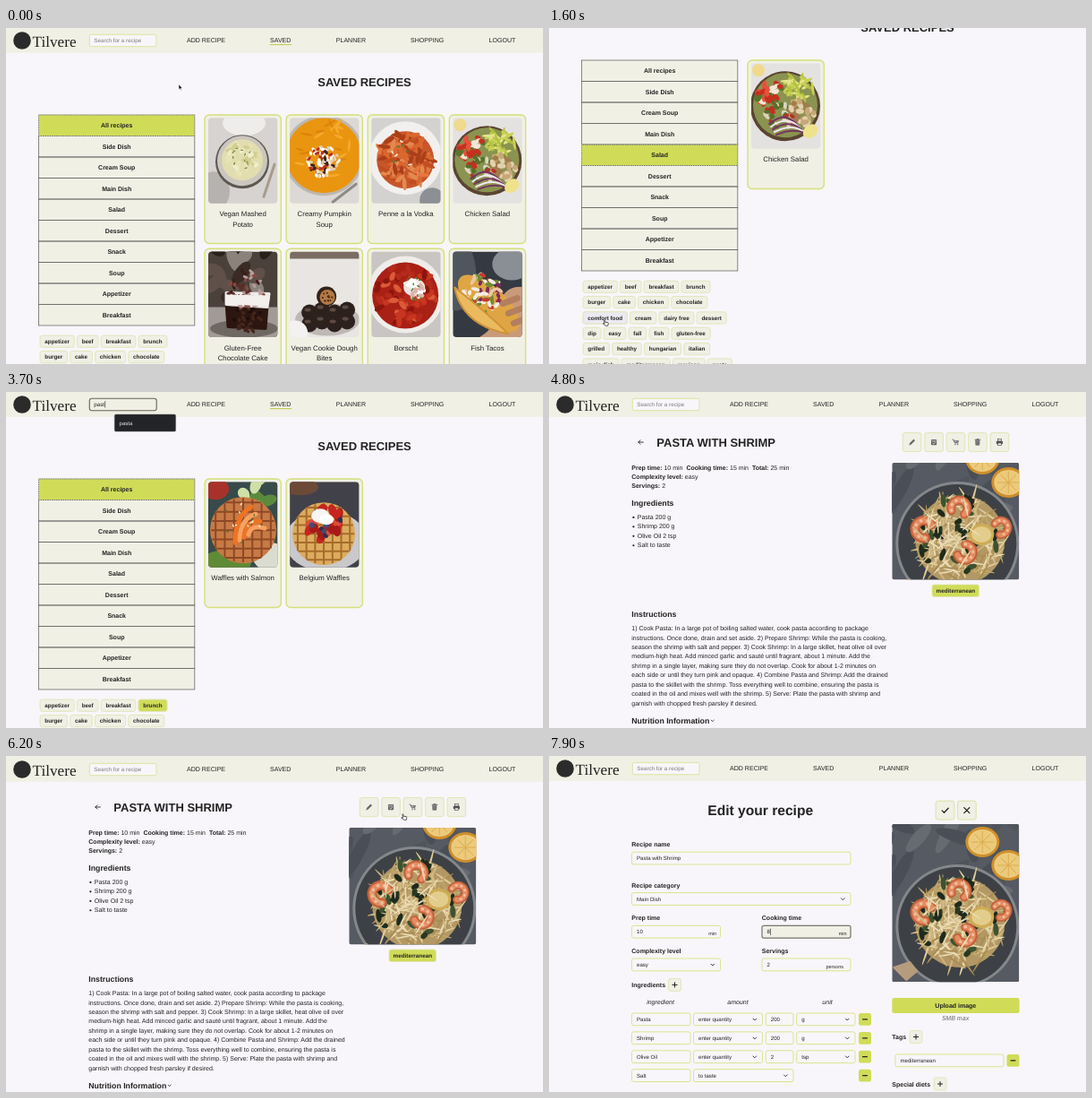
Write an HTML page that moves like this. It is 600 by 375 pixels and loops after 8000 ms.

```html
<!DOCTYPE html>
<html lang="en">
<head>
<meta charset="utf-8">
<title>Recipe book</title>
<style>
  html, body { margin: 0; width: 100%; height: 100%; overflow: hidden; background: #f8f6fa; }
  svg { display: block; width: 100vw; height: 100vh; }
  text { font-family: "Liberation Sans", Arial, sans-serif; text-rendering: geometricPrecision; fill: #222; }
  text.brand { font-family: "Liberation Serif", "Noto Serif", serif; }
</style>
</head>
<body>
<svg id="stage" viewBox="0 0 600 375"></svg>
<script>
const LOOP = 8000, STEP = 100;
const LIME = '#d0dc58', EDGE = '#d8e284', PALE = '#f0f0e5', PAPER = '#f8f6fa', INK = '#222';
const stage = document.getElementById('stage');

// Drawing helpers
function add(parent, tag, attrs = {}, text) {
  const el = document.createElementNS('http://www.w3.org/2000/svg', tag);
  for (const k in attrs) el.setAttribute(k, attrs[k]);
  if (text !== undefined) el.textContent = text;
  return parent.appendChild(el);
}
const group = (p, x = 0, y = 0, extra = '') => add(p, 'g', { transform: `translate(${x} ${y}) ${extra}` });
const box = (p, x, y, width, height, fill, stroke = 'none', rx = 0, sw = 1) =>
  add(p, 'rect', { x, y, width, height, fill, stroke, rx, 'stroke-width': sw });
const oval = (p, cx, cy, rx, fill, ry = rx, turn = 0) =>
  add(p, 'ellipse', { cx, cy, rx, ry, fill, transform: `rotate(${turn} ${cx} ${cy})` });
const path = (p, d, stroke, sw = 1, fill = 'none') =>
  add(p, 'path', { d, stroke, fill, 'stroke-width': sw, 'stroke-linecap': 'round', 'stroke-linejoin': 'round' });
// y is the middle of the capitals
const label = (p, x, y, text, size, attrs = {}) =>
  add(p, 'text', { x, y: y + size * 0.36, 'font-size': size, ...attrs }, text);
const BOLD = { 'font-weight': 700 }, MID = { 'text-anchor': 'middle' }, BOLD_MID = { ...BOLD, ...MID };

// Timing helpers: each track sets one element from the time
const tracks = [];
function show(el, ...spans) {
  tracks.push(t => { el.style.display = spans.some(([a, b]) => t >= a && t < b) ? '' : 'none'; });
  return el;
}
function valuesAt(steps, t) {
  const i = steps.findIndex(([time]) => time > t);
  if (i < 1) return steps.at(i).slice(1);
  const [a, ...from] = steps[i - 1], [b, ...to] = steps[i];
  const k = (t - a) / (b - a), eased = k * k * (3 - 2 * k);
  return from.map((v, n) => v + (to[n] - v) * eased);
}
const move = (el, steps) =>
  tracks.push(t => el.setAttribute('transform', `translate(${valuesAt(steps, t)})`));
const fade = (el, steps) =>
  tracks.push(t => el.setAttribute('opacity', valuesAt(steps, t)[0]));
function typed(p, x, y, size, table) {
  for (const [from, to, text] of table) {
    const g = show(group(p), [from, to]);
    const end = x + label(g, x, y, text, size).getComputedTextLength() + 0.6;
    path(g, `M${end} ${y - 3.4}v6.8`, INK, 0.6);
  }
}

// Photo helpers
function random(seed) {
  return () => (seed = seed * 16807 % 2147483647) / 2147483647;
}
function bits(p, seed, n, cx, cy, spread, rx, ry, colours) {
  const rnd = random(seed * 7919);
  for (let i = 0; i < n; i++) {
    const a = rnd() * 6.283, d = spread * Math.sqrt(rnd());
    oval(p, cx + d * Math.cos(a), cy + d * Math.sin(a), rx * (0.7 + rnd() * 0.6),
      colours[Math.floor(rnd() * colours.length)], ry, rnd() * 180);
  }
}
let clips = 0;
function photo(p, x, y, w, h, r, draw, extra) {
  const id = 'clip' + clips++, g = group(p, x, y);
  box(add(g, 'clipPath', { id }), 0, 0, w, h, '#000', 'none', r);
  g.setAttribute('clip-path', `url(#${id})`);
  draw(group(g, 0, 0, extra));
}
function waffle(g, cx, cy, r, fill, line) {
  oval(g, cx, cy, r, fill);
  for (let i = -3; i <= 3; i++) {
    const d = i * r / 3.6, half = Math.sqrt(r * r - d * d) * 0.95;
    path(g, `M${cx + d} ${cy - half}v${2 * half}M${cx - half} ${cy + d}h${2 * half}`, line, 2);
  }
}
function shrimp(g, x, y, turn, scale = 1) {
  const s = group(g, x, y, `rotate(${turn}) scale(${scale})`);
  const arc = 'M-7 6A9 9 0 1 1 8 5';
  path(s, arc, '#c4613c', 10);
  path(s, arc, '#e58c62', 6);
  path(s, arc, '#f2bfa0', 3).setAttribute('stroke-dasharray', '0.5 6');
}

const dishes = {
  mash(g) {
    box(g, 0, 0, 78, 96, '#d6d3d0');
    oval(g, 40, 6, 24, '#efedeb', 14);
    oval(g, 6, 82, 18, '#b6b2af', 22);
    oval(g, 38, 49, 30, '#5d5751');
    oval(g, 38, 48, 28, '#cbc7bf');
    oval(g, 38, 47, 23, '#e2ddaf');
    bits(g, 1, 34, 38, 46, 18, 4, 2, ['#f0edcb', '#d3ce92', '#e8e3b6']);
    bits(g, 2, 12, 38, 44, 14, 1.4, 0.7, ['#74883a']);
    path(g, 'M62 88L74 52', '#a79b8c', 3);
  },
  soup(g) {
    box(g, 0, 0, 78, 96, '#dcd8d5');
    oval(g, 38, 42, 45, '#bdb7af');
    oval(g, 38, 42, 42, '#ea950f');
    bits(g, 3, 22, 36, 34, 34, 6, 1.4, ['#f4ab2c', '#dd840b']);
    bits(g, 4, 80, 37, 48, 18, 2.8, 1.6, ['#f8f3ea', '#43211a', '#b8321f', '#fff', '#e3cdb2']);
    path(g, 'M48 94L74 74', '#8d8a87', 3);
  },
  penne(g) {
    box(g, 0, 0, 78, 96, '#d3d2d0');
    oval(g, 38, 45, 41, '#f2f0ee');
    oval(g, 38, 47, 32, '#c9552a');
    bits(g, 5, 95, 38, 46, 29, 7, 2.4, ['#c24d20', '#e28a50', '#d9682f', '#ab3f18', '#e5773c']);
    bits(g, 6, 8, 36, 38, 16, 2.2, 1, ['#5d7a34', '#f0ddc8']);
    oval(g, 68, 92, 14, '#8c8f93');
  },
  salad(g) {
    box(g, 0, 0, 78, 96, '#e4e2e0');
    oval(g, 8, 8, 7, '#f1d98c');
    oval(g, 38, 48, 39, '#5a4431');
    oval(g, 38, 47, 36, '#8a9350');
    bits(g, 7, 40, 22, 38, 17, 4, 2.6, ['#c5301f', '#e8503a', '#f3e5d4', '#56752b']);
    bits(g, 8, 34, 54, 27, 16, 6, 1.6, ['#c8d155', '#e5e58a', '#b3c23e']);
    bits(g, 9, 30, 57, 55, 14, 4, 2.8, ['#c8a778', '#e3d1ad', '#9f7c4d']);
    bits(g, 10, 24, 30, 58, 16, 4, 2, ['#55702a', '#b43425', '#dcd4bd']);
    for (let i = 0; i < 5; i++) path(g, `M${20 + i * 2} ${68 + i * 3}q18 -${16 - i * 2} 32 ${2 - i}`, i % 2 ? '#f0e6ee' : '#75345f', 2);
    oval(g, 66, 76, 9, '#efe28c', 7, -40);
  },
  cake(g) {
    box(g, 0, 0, 78, 96, '#4b413b');
    bits(g, 11, 18, 38, 16, 40, 12, 7, ['#3a2b24', '#8b827c', '#5f5049', '#2a201c']);
    box(g, 0, 62, 78, 34, '#a19a95');
    oval(g, 40, 86, 38, '#6f6762', 10);
    path(g, 'M20 58L66 60 64 86 22 84Z', '#2c1610', 3, '#2c1610');
    bits(g, 12, 30, 44, 73, 16, 3, 1.8, ['#45251b', '#1e0e0a']);
    path(g, 'M20 46L68 47 66 62 20 59Z', '#eeeae8', 3, '#eeeae8');
    bits(g, 13, 44, 43, 42, 21, 3, 1.6, ['#5c2b27', '#874944', '#b99c98', '#3c1d1a']);
    path(g, 'M20 49L68 50 66 60 20 58Z', '#f2efed', 2, '#f2efed');
  },
  dough(g) {
    box(g, 0, 0, 78, 96, '#e8e5e2');
    box(g, 0, 0, 78, 8, '#7b6d62');
    oval(g, 42, 76, 36, '#bdb8b3', 18);
    for (let i = 0; i < 8; i++) {
      const x = 22 + (i % 4) * 14, y = 68 + Math.floor(i / 4) * 13 - (i % 2) * 3;
      oval(g, x, y, 9, '#2d211d');
      oval(g, x - 2, y - 3, 3.5, '#5c4a43', 2);
    }
    oval(g, 41, 50, 11, '#31221b');
    oval(g, 42, 51, 8.5, '#b47a44');
    bits(g, 14, 9, 42, 51, 6, 1.3, 1, ['#4a2818']);
    oval(g, 6, 91, 14, '#f4f2f0');
  },
  borscht(g) {
    box(g, 0, 0, 78, 96, '#c9c5c2');
    oval(g, 38, 48, 43, '#efedea');
    oval(g, 38, 49, 37, '#a92015');
    bits(g, 15, 66, 38, 48, 33, 5, 3, ['#c8361f', '#8c150d', '#db5a38', '#b62a1b']);
    oval(g, 48, 40, 12, '#efe4e0', 10);
    bits(g, 16, 18, 48, 41, 11, 4, 2.4, ['#fff', '#f4eae6', '#dbb5ab']);
    bits(g, 17, 12, 44, 42, 17, 1.8, 0.8, ['#5d7930']);
  },
  taco(g) {
    box(g, 0, 0, 78, 96, '#343942');
    oval(g, 4, 26, 22, '#50565e', 40);
    oval(g, 66, 14, 22, '#8a8f96', 18);
    path(g, 'M78 40Q56 38 52 62T30 96H78Z', '#c99a7a', 1, '#c99a7a');
    oval(g, 40, 58, 43, '#dfa545', 19, 42);
    bits(g, 18, 70, 34, 48, 22, 4, 2, ['#7a2c5c', '#f4ece1', '#c63b2b', '#6d8a35', '#e9c9a0']);
    path(g, 'M2 40Q10 82 62 92 40 70 2 40Z', '#cf9238', 2, '#ebba5f');
    for (let i = 0; i < 3; i++) path(g, `M${56 + i * 6} ${58 + i * 11}l16 -6`, '#b27f60', 7);
  },
  salmon(g) {
    box(g, 0, 0, 78, 96, '#384a4a');
    oval(g, 8, 8, 15, '#a8322b', 12);
    bits(g, 19, 8, 52, 9, 20, 8, 6, ['#8fb562', '#cfe0a6', '#5c8a3c']);
    oval(g, 20, 90, 28, '#5f8b36', 14);
    oval(g, 70, 84, 20, '#d9dccf', 16);
    waffle(g, 39, 54, 37, '#c77a45', '#8e4824');
    for (let i = 0; i < 4; i++) path(g, `M${30 + i * 5} ${68 - i * 3}Q${30 + i * 6} ${38 + i * 3} ${48 + i * 5} ${28 + i * 8}`, i % 2 ? '#f7a060' : '#ec7424', 5);
    bits(g, 20, 14, 36, 46, 22, 1.6, 0.8, ['#59782e', '#f7e8d4']);
  },
  berries(g) {
    box(g, 0, 0, 78, 96, '#41414a');
    oval(g, 12, 6, 20, '#6b4a38', 9);
    oval(g, 40, 66, 46, '#c9c8cb', 34);
    waffle(g, 38, 58, 35, '#dcab5e', '#a56c2a');
    bits(g, 21, 22, 40, 47, 22, 6.5, 4.5, ['#c5261f', '#e04a3c', '#a81a18']);
    bits(g, 22, 9, 42, 46, 18, 3.2, 3.2, ['#2b3150', '#454c70']);
    oval(g, 34, 38, 10, '#f8f5f2', 8);
    oval(g, 41, 42, 8, '#fff', 6);
  },
  pasta(g) {
    box(g, 0, 0, 142, 176, '#565a62');
    bits(g, 23, 22, 60, 24, 80, 24, 7, ['#4a4e56', '#666a71', '#50545b']);
    for (const [x, y] of [[101, 20], [130, 46]]) {
      oval(g, x, y, 19, '#cf8f2c', 17);
      oval(g, x, y, 16, '#ecca7c', 14);
      for (let i = 0; i < 4; i++) path(g, `M${x - 12} ${y}h24`, '#dcae50', 1).setAttribute('transform', `rotate(${i * 45} ${x} ${y})`);
    }
    oval(g, 73, 114, 69, '#85888b');
    oval(g, 73, 114, 66, '#3d4145');
    oval(g, 76, 110, 50, '#b39865');
    bits(g, 24, 150, 75, 110, 47, 15, 1.1, ['#dfcc9c', '#cdb37c', '#eadbb4', '#a98d55', '#bfa468']);
    bits(g, 25, 36, 72, 108, 46, 6, 3, ['#293822', '#3d5230', '#1f2b1c']);
    shrimp(g, 75, 74, 20);
    shrimp(g, 35, 98, -60, 1.1);
    shrimp(g, 82, 124, 130);
    shrimp(g, 122, 96, 70, 0.9);
    oval(g, 100, 104, 14, '#cfac55', 12);
    oval(g, 100, 104, 11, '#e2cd8c', 9);
    bits(g, 26, 30, 76, 112, 46, 10, 0.9, ['#eadbb4', '#d3bb84']);
    path(g, 'M2 160l18 -6 8 10 -12 10z', '#b59c7c', 2, '#b59c7c');
  }
};
const pastaCard = g => dishes.pasta(group(g, 0, 0, 'scale(0.543)'));

// Page frame
box(stage, 0, 0, 600, 375, PAPER);
const page = group(stage);
move(page, [[0, 0, 0], [1000, 0, 0], [1300, 0, -61], [2750, 0, -61], [2950, 0, 0], [5000, 0, 0],
  [5300, 0, -60], [5600, 0, -60], [6000, 0, 1], [6250, 0, 1], [6400, 0, 0]]);
const saved = show(group(page), [0, 4700]);
const recipe = show(group(page), [4700, 6700]);
const edit = show(group(page), [6700, LOOP]);

// Saved recipes
label(saved, 400.5, 60.5, 'SAVED RECIPES', 13, BOLD_MID);
box(saved, 36.5, 97, 174.3, 235, PALE);
const rowY = i => 97 + i * 23.5;
const picks = [[0, [0, 700], [2350, LOOP]], [4, [700, 2350]]];
for (const [i, ...spans] of picks) show(box(saved, 36.5, rowY(i), 174.3, 23.5, LIME), ...spans);
'All recipes,Side Dish,Cream Soup,Main Dish,Salad,Dessert,Snack,Soup,Appetizer,Breakfast'.split(',').forEach((name, i) => {
  box(saved, 36.5, rowY(i), 174.3, 23.5, 'none', '#6b6b68', 0, 0.8);
  label(saved, 123.7, rowY(i) + 11.6, name, 7, BOLD_MID);
});
for (const [i, ...spans] of picks) {
  const outline = show(box(saved, 36.5, rowY(i), 174.3, 23.5, 'none', '#e4e8b4', 0, 0.9), ...spans);
  outline.setAttribute('stroke-dasharray', '1 1.5');
}

let chipX = 38, chipY = 349.8;
const tags = 'appetizer,beef,breakfast,brunch,burger,cake,chicken,chocolate,comfort food,cream,dairy free,dessert,' +
  'dip,easy,fall,fish,gluten-free,grilled,healthy,hungarian,italian,main dish,mediterranean,mexican,pasta';
for (const tag of tags.split(',')) {
  const g = group(saved), text = label(g, 0, 0, tag, 6.3, BOLD);
  const w = text.getComputedTextLength() + 10.6;
  if (chipX + w > 210) { chipX = 38; chipY += 17.35; }
  g.setAttribute('transform', `translate(${chipX} ${chipY})`);
  text.setAttribute('x', 5.3);
  const chip = fill => g.insertBefore(box(g, 0, -6.6, w, 13.2, fill, '#e0e6b4', 2.5, 0.9), text);
  chip(PALE);
  if (tag === 'comfort food') show(chip('#ebeaf2'), [1480, 1980]);
  if (tag === 'brunch') fade(show(chip(LIME), [2380, 4000]), [[0, 0], [2380, 0], [2780, 1]]);
  chipX += w + 3.2;
}

function card(p, col, row, title, draw) {
  const g = group(p, 222 + col * 91.1, 97 + row * 149.3);
  box(g, 0, 0, 85.3, 143.5, PALE, '#d5e07a', 5, 1.4);
  photo(g, 4, 3.2, 77.3, 95.5, 4, draw);
  title.split('|').forEach((line, i) => label(g, 42.6, 110.5 + i * 11.6, line, 7.85, MID));
}
const all = show(group(saved), [0, 700]);
[['Vegan Mashed|Potato', 'mash'], ['Creamy Pumpkin|Soup', 'soup'], ['Penne a la Vodka', 'penne'], ['Chicken Salad', 'salad'],
 ['Gluten-Free|Chocolate Cake', 'cake'], ['Vegan Cookie Dough|Bites', 'dough'], ['Borscht', 'borscht'], ['Fish Tacos', 'taco']]
  .forEach(([title, dish], i) => card(all, i % 4, i >> 2, title, dishes[dish]));
card(show(group(saved), [700, 2350]), 0, 0, 'Chicken Salad', dishes.salad);
const brunch = show(group(saved), [2350, 4000]);
card(brunch, 0, 0, 'Waffles with Salmon', dishes.salmon);
card(brunch, 1, 0, 'Belgium Waffles', dishes.berries);
const found = show(group(saved), [4000, 4700]);
card(found, 0, 0, 'Penne a la Vodka', dishes.penne);
card(found, 1, 0, 'Pasta with Shrimp', pastaCard);

// Recipe page
path(recipe, 'M105.3 56h-5.4M102 53.8L99.8 56 102 58.2', INK, 0.9);
label(recipe, 120.3, 56, 'PASTA WITH SHRIMP', 13, BOLD);
const icons = [
  g => path(g, 'M-3 3L-2.4 1 1.8 -3.2 3.2 -1.8 -1 2.4Z', '#666', 0.3, '#666'),
  g => { box(g, -3.1, -3, 6.2, 6.2, '#666', 'none', 0.8); path(g, 'M-2 -1.2h4M-1.2 1.2l1 .9 1.6 -1.8', PALE, 0.7); },
  g => { path(g, 'M-3.6 -3h1.2l1.4 4h3.6M-2 -1.6h5.2L2.4 .2h-3.6Z', '#777', 0.8, '#777'); oval(g, -0.6, 2.6, 0.8, '#777'); oval(g, 2.2, 2.6, 0.8, '#777'); },
  g => { path(g, 'M-2.1 -1.6h4.2l-.3 4.8h-3.6Z', '#555', 0.6, '#777'); path(g, 'M-2.9 -2.7h5.8M-.8 -3.4h1.6', '#555', 0.9); },
  g => { box(g, -3.6, -1.2, 7.2, 3.4, '#555', 'none', 0.8); box(g, -2, -3.4, 4, 2.2, PALE, '#555', 0, 0.7); box(g, -2, 1, 4, 2.4, PALE, '#555', 0, 0.7); }
];
icons.forEach((icon, i) => {
  const g = group(recipe, 405.6 + i * 24.45, 56);
  box(g, -10.3, -10.6, 20.6, 21.2, PALE, '#e0e6b4', 2.5);
  icon(g);
});
function facts(y, ...parts) {
  const text = label(recipe, 92.3, y, '', 7);
  parts.forEach((part, i) => add(text, 'tspan', i % 2 ? {} : BOLD, part));
}
facts(84, 'Prep time:', ' 10 min\u00a0 ', 'Cooking time:', ' 15 min\u00a0 ', 'Total:', ' 25 min');
facts(94.3, 'Complexity level:', ' easy');
facts(104.6, 'Servings:', ' 2');
label(recipe, 92.3, 124, 'Ingredients', 8.75, BOLD);
['Pasta 200 g', 'Shrimp 200 g', 'Olive Oil 2 tsp', 'Salt to taste'].forEach((item, i) => {
  oval(recipe, 94.4, 139.9 + i * 10.45, 1.1, INK);
  label(recipe, 98.8, 139.5 + i * 10.45, item, 7);
});
label(recipe, 92.3, 247.6, 'Instructions', 8.75, BOLD);
`1) Cook Pasta: In a large pot of boiling salted water, cook pasta according to package
instructions. Once done, drain and set aside. 2) Prepare Shrimp: While the pasta is cooking,
season the shrimp with salt and pepper. 3) Cook Shrimp: In a large skillet, heat olive oil over
medium-high heat. Add minced garlic and sauté until fragrant, about 1 minute. Add the
shrimp in a single layer, making sure they do not overlap. Cook for about 1-2 minutes on
each side or until they turn pink and opaque. 4) Combine Pasta and Shrimp: Add the drained
pasta to the skillet with the shrimp. Toss everything well to combine, ensuring the pasta is
coated in the oil and mixes well with the shrimp. 5) Serve: Plate the pasta with shrimp and
garnish with chopped fresh parsley if desired.`.split('\n').forEach((line, i) => label(recipe, 92.3, 263.6 + i * 10.43, line, 7));
label(recipe, 92.3, 366.5, 'Nutrition Information', 8.75, BOLD);
path(recipe, 'M181.2 366.2l1.5 1.4 1.5 -1.4', INK, 0.8);
photo(recipe, 383.3, 79, 142, 130.3, 2, dishes.pasta, 'translate(0 -24)');
box(recipe, 428, 215, 52.5, 13.5, LIME, '#e0e6b4', 2.5, 0.8);
label(recipe, 454.3, 221.8, 'mediterranean', 6.3, BOLD_MID);

// Edit form
const chevron = (x, y) => path(edit, `M${x - 1.8} ${y - 0.8}l1.8 1.8 1.8 -1.8`, INK, 0.9);
function field(x, y, w, text, { select, unit } = {}) {
  box(edit, x, y, w, 13.8, PAPER, EDGE, 2, 0.9);
  label(edit, x + 5.5, y + 7, text, 6.1);
  if (select) chevron(x + w - 8.7, y + 7);
  if (unit) label(edit, x + w - 4.5, y + 8.8, unit, 5.5, { 'text-anchor': 'end' });
}
const title = (x, y, text) => label(edit, x, y, text, 7, BOLD);
function plus(x, y) {
  box(edit, x - 7, y - 7, 14, 14, PALE, '#e0e6b4', 2.5, 0.9);
  path(edit, `M${x - 2.6} ${y}h5.2M${x} ${y - 2.6}v5.2`, INK, 1);
}
function minus(x, y) {
  box(edit, x, y, 14, 13.8, LIME, 'none', 2.5);
  path(edit, `M${x + 4.6} ${y + 6.9}h4.8`, INK, 1.3);
}
label(edit, 236.2, 60.5, 'Edit your recipe', 15.6, BOLD_MID);
for (const [x, d] of [[442.5, 'M-3.4 .3L-1 2.7 3.6 -2.4'], [466.8, 'M-3 -3L3 3M3 -3L-3 3']]) {
  const g = group(edit, x, 60.6);
  box(g, -10.4, -10.4, 20.8, 20.8, PALE, '#dbe3a0', 2.5);
  path(g, d, INK, 1.3);
}
title(92.3, 98.6, 'Recipe name');
field(92.5, 107.2, 244.5, 'Pasta with Shrimp');
title(92.3, 144, 'Recipe category');
field(92.5, 152.6, 244.5, 'Main Dish', { select: true });
title(92.3, 180.6, 'Prep time');
field(92.5, 189.3, 99, '10', { unit: 'min' });
title(237.8, 180.6, 'Cooking time');
field(238, 189.3, 99, '', { unit: 'min' });
show(label(edit, 243.5, 196.3, '15', 6.1), [6700, 7300]);
const focus = show(group(edit), [7300, LOOP]);
box(focus, 238, 189.3, 99, 13.8, PALE, '#777', 2, 1.2);
label(focus, 332.5, 198.1, 'min', 5.5, { 'text-anchor': 'end' });
typed(focus, 243.5, 196.3, 6.1, [[7300, 7450, '15'], [7450, 7550, '1'], [7550, 7700, ''], [7700, LOOP, '8']]);
title(92.3, 217, 'Complexity level');
field(92.5, 226, 99, 'easy', { select: true });
title(237.8, 217, 'Servings');
field(238, 226, 99, '2');
label(edit, 329, 234.6, 'persons', 5.5, { 'text-anchor': 'end' });
title(92.3, 255.5, 'Ingredients');
plus(140.5, 255.4);
for (const [x, name] of [[124.5, 'ingredient'], [211, 'amount'], [311, 'unit']])
  label(edit, x, 274.8, name, 7, { ...MID, 'font-style': 'italic' });
[['Pasta', '200', 'g'], ['Shrimp', '200', 'g'], ['Olive Oil', '2', 'tsp'], ['Salt']].forEach(([name, count, unit], i) => {
  const y = 287 + i * 20.9;
  field(92.5, y, 65.5, name);
  field(161.5, y, count ? 77 : 111.5, count ? 'enter quantity' : 'to taste', { select: true });
  if (count) {
    field(242.3, y, 30.7, count);
    field(276.7, y, 65.3, unit, { select: true });
  }
  minus(346, y);
});
photo(edit, 383.3, 76, 142, 176.3, 2, dishes.pasta);
box(edit, 383.3, 270, 142.3, 17, LIME, 'none', 2.5);
label(edit, 454.3, 278.5, 'Upload image', 7, BOLD_MID);
label(edit, 454.3, 292.6, '5MB max', 7.1, { ...MID, 'font-style': 'italic', style: 'fill:#666' });
title(383.3, 313.5, 'Tags');
plus(410, 313.5);
field(387, 333, 121, 'mediterranean');
minus(511.5, 333);
title(383.3, 366, 'Special diets');
plus(437, 366);

// Header
box(page, 0, -60, 600, 87.8, '#f0f0e4');
oval(page, 18, 14, 9.8, '#2b2b2b');
label(page, 29.5, 14.6, 'Tilvere', 17.2, { class: 'brand' });
for (const [x, name] of [[202, 'ADD RECIPE'], [295, 'SAVED'], [368.8, 'PLANNER'], [452, 'SHOPPING'], [539.6, 'LOGOUT']])
  label(page, x, 13.7, name, 7.05);
show(path(page, 'M295.3 18.6h23.4', '#b7c43c', 0.9), [0, 4700]);
box(page, 93.3, 7.3, 74.7, 13.4, PAPER, '#dde5a2', 2, 1);
show(label(page, 98.3, 13.8, 'Search for a recipe', 6.25, { style: 'fill:#7a7a7a' }), [0, 3100], [4700, LOOP]);
const search = show(group(page), [3100, 4700]);
box(search, 93.3, 7.3, 74.9, 13.4, '#f0f0e4', '#666', 2.5, 1.1);
typed(search, 98.3, 13.8, 6.25, [[3100, 3250, ''], [3250, 3400, 'p'], [3400, 3550, 'pa'], [3550, 3650, 'pas'],
  [3650, 3800, 'past'], [3800, 4700, 'pasta']]);
const hint = show(group(page), [3300, 3900]);
box(hint, 121.3, 25, 68.3, 19, '#232428', '#55565a', 1.5, 0.5);
label(hint, 126.6, 34.5, 'pasta', 6, { style: 'fill:#e8e8e8' });

// Pointer
const pointer = group(stage);
move(pointer, [[0, 193, 63], [150, 193, 63], [650, 150, 203], [1050, 150, 203], [1500, 61, 325.5], [1900, 61, 325.5],
  [2200, 165, 287], [2380, 165, 287], [2600, 158, 115.5], [3000, 135, 12], [4000, 135, 12], [4450, 356, 150],
  [4650, 356, 150], [4800, 438, 160], [5900, 438, 160], [6200, 442.5, 64.5], [6450, 406, 56], [6750, 406, 56],
  [7150, 282, 195]]);
const arrow = show(group(pointer), [0, 330], [2750, 3200], [4000, 4250], [4700, 6120], [6700, 7500]);
path(arrow, 'M0 0V5.6L1.3 4.5 2.2 6.4 3 6 2.2 4.2H4Z', '#fff', 0.5, '#111');
const hand = show(group(pointer), [330, 2750], [4250, 4700], [6120, 6700]);
path(hand, 'M1 3.6L.2 .8Q.5 -.2 1.2 .6L2 2.9 4.6 3Q5.4 3.4 5.2 4.6L4.8 6.8H2.2L-.8 4.4Q-.4 3.4 1 4.4Z', '#333', 0.8, '#fff');

// Ten pictures a second; half a display frame of slack absorbs timer rounding
function render(now) {
  const t = Math.floor((now + 8) / STEP) * STEP % LOOP;
  for (const track of tracks) track(t);
}
function tick(now) {
  render(now);
  requestAnimationFrame(tick);
}
render(performance.now());
requestAnimationFrame(tick);
</script>
</body>
</html>
```
